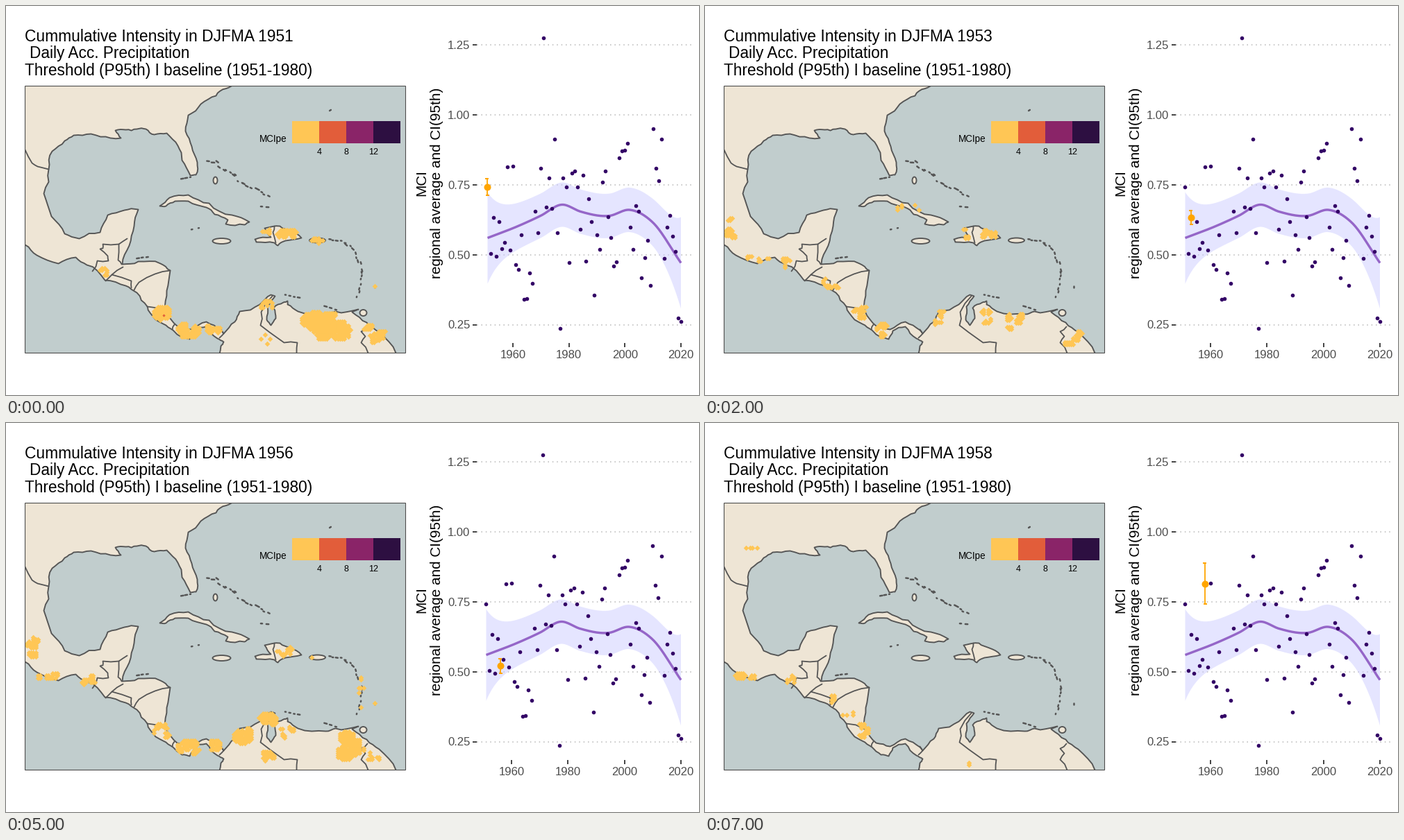
Recreate the animation shown at these times as a matplotlib script. Size 998 by 561 pixels, loop 8 s.

```python
import numpy as np
import matplotlib.pyplot as plt
from matplotlib.animation import FuncAnimation
from matplotlib.collections import LineCollection
from matplotlib.patches import Ellipse, Polygon, Rectangle

W, H, DPI = 998, 561, 64
PX = 72 / DPI
FIRST_YEAR = 1951
SEA, LAND, COAST = "#c1cdcd", "#eee5d5", "#555555"
RAMP = ["#ffc655", "#e25d3a", "#8a2468", "#2d0f41"]
ORANGE, INDIGO, GREY = "#ffa500", "#330066", "#4d4d4d"
X_LEFT, X_RIGHT = 691, 971.5
STEP = 3.1

plt.rcParams["font.family"] = "Liberation Sans"

# ---- map: key points in stage pixels, roughened when drawn ----
NORTH = [
    (324, 105), (324, 115), (308, 122), (302, 129), (280, 141), (262, 157),
    (258, 180), (267, 202), (275, 225), (273, 243), (265, 244), (253, 222),
    (247, 201), (231, 183), (213, 185), (201, 177), (188, 177), (172, 178),
    (157, 179), (165, 190), (150, 190), (122, 184), (97, 186), (84, 194),
    (66, 209), (61, 235)]
GULF = [
    (54, 270), (65, 303), (84, 328), (105, 335), (135, 326), (146, 301),
    (170, 294), (190, 293), (184, 317), (177, 345), (167, 372), (190, 368),
    (222, 371), (236, 381), (231, 410), (230, 440), (246, 461), (266, 466),
    (288, 455), (309, 467)]
SOUTH = [
    (313, 472), (329, 455), (336, 440), (365, 430), (381, 416), (387, 418),
    (376, 433), (375, 452), (381, 460), (388, 450), (385, 435), (399, 427),
    (405, 425), (405, 430), (420, 440), (460, 444), (474, 440), (507, 437),
    (498, 441), (519, 456), (537, 470), (561, 500), (565, 515), (308, 515)]
PACIFIC = [
    (309, 490), (313, 484), (304, 479), (288, 462), (270, 468), (264, 480),
    (253, 478), (240, 467), (226, 458), (207, 442), (203, 433), (188, 413),
    (172, 403), (142, 395), (116, 373), (100, 362), (75, 371), (44, 359),
    (27, 344), (15, 340), (15, 105)]
CUBA = [
    (221, 288), (235, 276), (262, 272), (292, 284), (325, 301), (350, 311),
    (343, 315), (316, 314), (319, 308), (300, 300), (288, 290), (262, 281),
    (243, 281), (230, 288)]
HISPANIOLA = [
    (358, 336), (381, 333), (372, 320), (394, 317), (409, 324), (425, 334),
    (402, 338), (391, 345), (386, 341), (360, 340)]
# Jamaica, Puerto Rico, Trinidad, Andros: x, y, rx, ry
OVALS = [(310, 338.5, 13, 4), (448, 337.5, 11.5, 3.5), (514, 442, 5, 4.5),
         (301, 251, 3, 5)]

BORDERS = [
    [(27, 207), (37, 226), (45, 231), (61, 235)],
    [(124, 382), (131, 367), (147, 367), (146, 360), (135, 350), (139, 349),
     (139, 343), (162, 343), (174, 335)],
    [(162, 343), (161, 366), (166, 372)],
    [(168, 376), (152, 387), (143, 396)],
    [(152, 387), (180, 396), (180, 406)],
    [(184, 409), (191, 398), (214, 386), (236, 381)],
    [(203, 433), (229, 441)],
    [(242, 459), (239, 466)],
    [(309, 466), (313, 472), (307, 478)],
    [(383, 418), (367, 441), (366, 460), (379, 470), (400, 485), (419, 485),
     (418, 500)],
    [(520, 462), (511, 469), (517, 476), (511, 485), (521, 500)],
    [(386, 317), (384, 326), (388, 341)],
]

# Island chains: path and number of islets strewn along it
CHAINS = [
    ([(288, 224), (304, 226), (320, 238), (344, 257), (378, 275)], 20),
    ([(463, 337), (490, 341), (504, 354), (513, 385), (505, 419)], 20),
    ([(399, 416), (424, 420)], 4),
    ([(456, 432), (478, 438)], 3),
    ([(250, 249), (268, 246)], 3),
    ([(186, 364), (206, 361)], 3),
    ([(262, 323), (282, 319)], 2),
    ([(363, 289), (380, 290)], 2),
    ([(531, 404), (531, 406)], 1),
    ([(465, 151), (468, 149)], 1),
]

# Rain areas: x, y, rx, ry
AREAS = dict(
    texas=(68, 180, 10, 1), florida=(213, 180, 7, 1),
    sierra=(39, 324, 10, 20), oaxaca=(67, 364, 25, 6),
    chiapas=(118, 370, 10, 8), guatemala=(138, 384, 7, 7),
    yucatan=(186, 309, 4, 8), honduras=(182, 399, 16, 8),
    nicaragua=(213, 417, 17, 20), mosquitia=(231, 384, 7, 8),
    costa_rica=(225, 443, 13, 11), panama=(262, 467, 18, 11),
    darien=(298, 464, 10, 9), cuba=(295, 290, 20, 8),
    jamaica=(310, 339, 11, 3.2), haiti=(375, 328, 8, 9),
    dominica=(405, 329, 16, 9), puerto_rico=(446, 338, 11, 3.2),
    antilles=(511, 385, 3.2, 30), barbados=(531, 404, 1, 1),
    colombia=(340, 449, 14, 13), guajira=(376, 428, 15, 10),
    andes=(376, 483, 10, 12), zulia=(404, 444, 10, 14),
    llanos=(406, 477, 15, 17), caracas=(444, 453, 19, 13),
    guayana=(474, 470, 43, 30), orinoco=(490, 466, 20, 22),
    guyana=(530, 475, 18, 18))

# Share of each area that is wet, season by season
SEASONS = [
    dict(guatemala=.4, haiti=.3, dominica=.7, puerto_rico=.8, barbados=1,
         costa_rica=.85, panama=.8, darien=.6, guajira=.25, andes=.1,
         caracas=.8, guayana=.4, guyana=.35),
    dict(florida=.5, sierra=.08, honduras=.9, nicaragua=.85, dominica=.25,
         haiti=.08, puerto_rico=.4, antilles=.25, barbados=1, panama=.1,
         darien=.6, andes=.5, zulia=.1, caracas=.8),
    dict(sierra=.3, oaxaca=.2, chiapas=.3, cuba=.1, haiti=.3, dominica=.4,
         honduras=.3, costa_rica=.4, panama=.3, colombia=.2, zulia=.3,
         caracas=.3, guyana=.2),
    dict(florida=.8, sierra=.5, oaxaca=.25, chiapas=.2, yucatan=.6, cuba=.45,
         jamaica=.8, haiti=.7, dominica=.8, honduras=.65, mosquitia=.7,
         nicaragua=.1, costa_rica=.45, panama=.08, darien=.3, caracas=.06,
         guayana=.05, guyana=.1),
    dict(texas=.7, guatemala=.05, costa_rica=.25, panama=.1, guajira=.2,
         andes=.5, zulia=.6, llanos=.65, caracas=.9, guayana=1, guyana=.65),
    dict(sierra=.45, oaxaca=.35, chiapas=.5, dominica=.3, puerto_rico=.1,
         antilles=.2, barbados=1, costa_rica=.4, panama=.7, darien=.7,
         colombia=.8, guajira=.75, zulia=.25, andes=.5, orinoco=.75,
         guyana=.1),
    dict(florida=.4, sierra=.2, oaxaca=.25, chiapas=.3, cuba=.08, dominica=.3,
         honduras=.2, costa_rica=.3, panama=.2, guajira=.2, caracas=.25,
         guyana=.2),
    dict(texas=.6, oaxaca=.4, chiapas=.25, honduras=.15, nicaragua=.03,
         costa_rica=.35, andes=.04),
]
HEAVY = {1951: (227, 446), 1955: (374, 488)}

# ---- chart: yearly means, and interval half-widths of the shown years ----
MCI = np.array([
    .742, .504, .633, .496, .619, .521, .545, .815, .517, .817, .464, .448,
    .573, .342, .343, .435, .398, .657, .578, .811, 1.275, .672, .774, .665,
    .915, .578, .236, .776, .744, .473, .792, .800, .742, .592, .784, .478,
    .701, .619, .355, .573, .519, .760, .800, .637, .561, .459, .475, .846,
    .872, .874, .900, .599, .520, .675, .655, .419, .491, .551, .392, .950,
    .809, .766, .914, .487, .599, .640, .568, .513, .273, .263])
HALF_CI = [.030, .020, .025, .026, .016, .025, .025, .073]
TREND = [(691, 334), (735, 317), (768, 302), (799, 286), (826, 296),
         (868, 302), (897, 293.5), (930, 311), (971.5, 370)]


def mci_y(v):
    return 560.1 - 403.3 * np.asarray(v)


def rough(points, rng, rounds=2):
    """Wrinkle a line by shifting the middle of every segment sideways."""
    p = np.array(points, float)
    for _ in range(rounds):
        d = np.diff(p, axis=0)
        shift = rng.normal(0, 0.06, (len(d), 1)).clip(-0.1, 0.1)
        mid = p[:-1] + d / 2 + shift * d[:, ::-1] * [-1, 1]
        q = np.empty((2 * len(p) - 1, 2))
        q[::2], q[1::2] = p, mid
        p = q
    return p


def strew(path, n, rng):
    """Short strokes at even distances along a path, slightly scattered."""
    p = np.array(path, float)
    run = np.r_[0, np.cumsum(np.hypot(*np.diff(p, axis=0).T))]
    at = (np.arange(n) + 0.5) / n * run[-1]

    def along(s):
        return np.c_[np.interp(s, run, p[:, 0]), np.interp(s, run, p[:, 1])]

    shift = rng.normal(0, min(n / 10, 1.5), (n, 2))
    half = rng.uniform(0.5, 2, n)
    return list(np.stack([along(at - half) + shift,
                          along(at + half) + shift], axis=1))


def storm(x, y, rx, ry, share, rng):
    """The share of an area's grid cells that lie nearest to a few cores."""
    nx, ny = int(rx / STEP), int(ry / STEP)
    g = np.mgrid[-nx:nx + 1, -ny:ny + 1].reshape(2, -1).T * STEP
    g = g[((g / [rx, ry]) ** 2).sum(axis=1) <= 1.05]
    cores = g[rng.integers(len(g), size=4)]
    far = np.linalg.norm(g[:, None] - cores, axis=2).min(axis=1)
    order = np.argsort(far + 3 * rng.random(len(g)))
    return g[order[:max(1, round(share * len(g)))]] + [x, y]


def smooth(points, n=160):
    """Cubic Hermite curve through the points."""
    x, y = np.array(points, float).T
    m = np.gradient(y, x)
    t = np.linspace(x[0], x[-1], n)
    i = np.clip(np.searchsorted(x, t) - 1, 0, len(x) - 2)
    h = x[i + 1] - x[i]
    s = (t - x[i]) / h
    return t, ((1 + 2 * s) * (1 - s) ** 2 * y[i] + s * (1 - s) ** 2 * h * m[i]
               + s * s * (3 - 2 * s) * y[i + 1]
               + s * s * (s - 1) * h * m[i + 1])


def squeeze(x, left):
    """Fit chart x positions between the given left end and the right end."""
    return X_RIGHT - (X_RIGHT - x) * (X_RIGHT - left) / (X_RIGHT - X_LEFT)


fig = plt.figure(figsize=(W / DPI, H / DPI), dpi=DPI, facecolor="white")
ax = fig.add_axes([0, 0, 1, 1])
# Whole numbers fall on pixel centres.
ax.set_xlim(-0.5, W - 0.5)
ax.set_ylim(H - 0.5, -0.5)
ax.axis("off")


def label(x, y, s, size, color="black", **kw):
    return ax.text(x, y, s, fontsize=size * PX, color=color, **kw)


def stroke(x, y, color, width, **kw):
    return ax.plot(x, y, color=color, lw=width * PX,
                   solid_capstyle="butt", **kw)[0]


def scatter(size, color, **kw):
    return ax.scatter([], [], s=(size * PX) ** 2, color=color, lw=0, **kw)


# ---- map ----
BOX = (27, 114.5), 548, 385
clip = Rectangle(*BOX, transform=ax.transData)
rng = np.random.default_rng(4)


def on_map(artist):
    artist.set_clip_path(clip)
    return artist


ax.add_patch(Rectangle(*BOX, fc=SEA, ec="none", zorder=0))
shore = dict(fc=LAND, ec=COAST, lw=1.9 * PX, zorder=1)
for shape in (NORTH + GULF + SOUTH + PACIFIC, CUBA, HISPANIOLA):
    on_map(ax.add_patch(Polygon(rough(shape + shape[:1], rng),
                                joinstyle="round", **shore)))
for x, y, rx, ry in OVALS:
    on_map(ax.add_patch(Ellipse((x, y), 2 * rx, 2 * ry, **shore)))

borders = [rough(line, rng, 1) for line in BORDERS]
islets = [s for path, n in CHAINS for s in strew(path, n, rng)]
for lines, width in ((borders, 1.8), (islets, 2.5)):
    on_map(ax.add_collection(LineCollection(
        lines, colors=COAST, linewidths=width * PX, capstyle="round",
        zorder=2), autolim=False))

rain = on_map(scatter(5.4, RAMP[0], marker="D", zorder=3))
heavy = on_map(scatter(3, RAMP[1], marker="D", zorder=4))
ax.add_patch(Rectangle(*BOX, fc="none", ec=GREY, lw=1.1 * PX, zorder=5))

for k, color in enumerate(RAMP):
    ax.add_patch(Rectangle((411.8 + 39 * k, 165.5), 39, 31.5, fc=color,
                           ec="none", zorder=6))
    if k:
        label(411.5 + 39 * k, 213, str(4 * k), 12.5, ha="center")
label(364, 195.5, "MCIpe", 13.5)

title = label(26.5, 51, "", 22.8)
label(33.5, 75, "Daily Acc. Precipitation", 22.6)
label(26.5, 99.5, "Threshold (P95th) I baseline (1951-1980)", 22.65)

# ---- chart ----
for v in np.arange(1.25, 0.2, -0.25):
    y = mci_y(v)
    stroke([678, 987], [y, y], "#bebebe", 1.6, linestyle=(0, (1, 3)),
           dash_capstyle="butt", zorder=0)
    stroke([672, 677.5], [y, y], "#333333", 1.8)
    label(668, y + 5.6, f"{v:.2f}", 16.6, GREY, ha="right")
for x, s in ((604, "MCI"), (626, "regional average and CI(95th)")):
    label(x, 255, s, 20.7, rotation=90, ha="center", va="baseline",
          rotation_mode="anchor")

tx, ty = smooth(TREND)
# The interval is even in the middle and flares at both ends.
flare = 32 + 34 * np.linspace(-1, 1, len(tx)) ** 8
band_x = np.r_[tx, tx[::-1]]
band_y = np.r_[ty - flare, (ty + flare)[::-1]]
band = ax.add_patch(Polygon(np.c_[band_x, band_y], fc="#ccccff", alpha=0.5,
                            ec="none", zorder=1))
trend = stroke(tx, ty, "#9566c8", 3.4, zorder=2)

year_x = np.linspace(X_LEFT, X_RIGHT, len(MCI))
year_y = mci_y(MCI)
dots = scatter(5.6, INDIGO, zorder=3)
bar = stroke([], [], ORANGE, 1.8, zorder=4)
mark = scatter(10, ORANGE, zorder=5)
x_ticks = [(year, stroke([], [], "#333333", 1.8),
            label(0, 507.5, str(year), 16.6, GREY, ha="center"))
           for year in range(1960, 2021, 20)]

wet = [np.vstack([storm(*AREAS[name], share, rng)
                  for name, share in season.items()]) for season in SEASONS]


def update(k):
    year = FIRST_YEAR + k
    title.set_text(f"Cummulative Intensity in DJFMA {year}")
    rain.set_offsets(wet[k])
    heavy.set_offsets([HEAVY[year]] if year in HEAVY else np.empty((0, 2)))

    # The first error bar widens the year axis a little.
    left = X_LEFT + 2 * (k == 0)
    xs = squeeze(year_x, left)
    dots.set_offsets(np.c_[xs, year_y])
    trend.set_xdata(squeeze(tx, left))
    band.set_xy(np.c_[squeeze(band_x, left), band_y])
    for tick_year, tick, text in x_ticks:
        x = xs[tick_year - FIRST_YEAR]
        tick.set_data([x, x], [486, 491.5])
        text.set_x(x)

    x = xs[k]
    low, high = mci_y([MCI[k] - HALF_CI[k], MCI[k] + HALF_CI[k]])
    bar.set_data([x - 2, x + 2, x, x, x - 2, x + 2],
                 [low, low, low, high, high, high])
    mark.set_offsets([(x, year_y[k])])
    return []


anim = FuncAnimation(fig, update, frames=len(SEASONS), interval=1000,
                     repeat=True, repeat_delay=0,
                     init_func=lambda: update(0))
plt.show()
```
